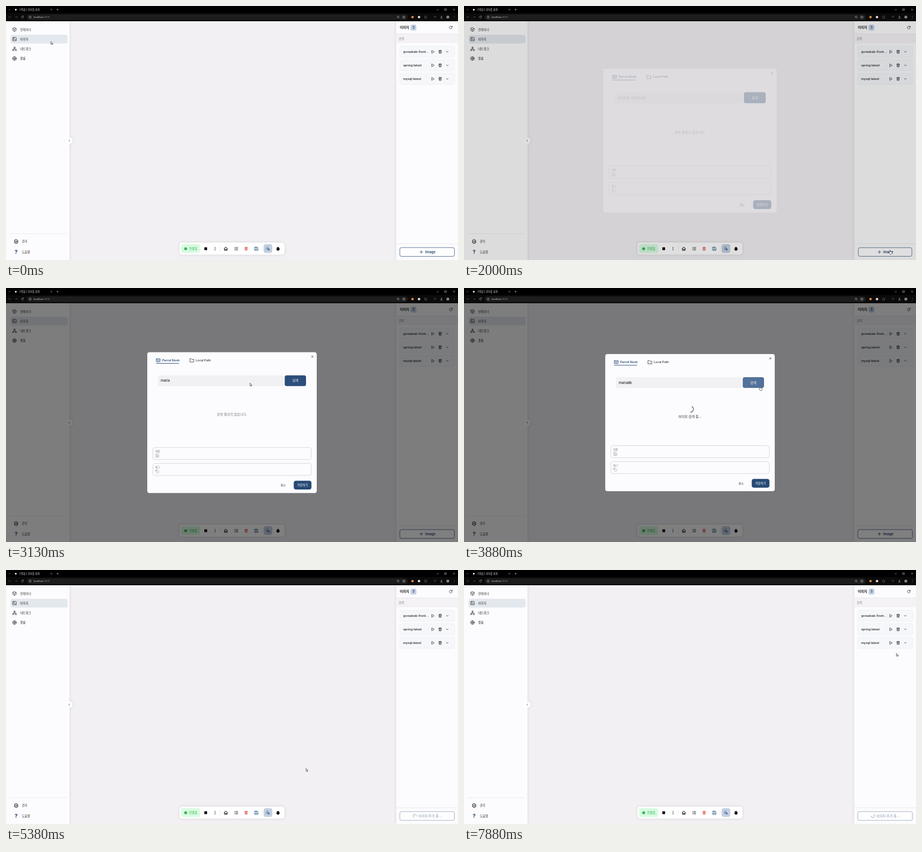
An HTML page that plays this animation: 800x450 px, repeating every 8000 ms.

```html
<!DOCTYPE html>
<html lang="ko">
<head>
<meta charset="utf-8">
<title>Image manager</title>
<style>
html, body { margin: 0; width: 100%; height: 100%; overflow: hidden; background: #f2f0f3; }
svg { display: block; width: 100vw; height: 100vh; }
text { font: 500 5.3px Inter, "Noto Sans CJK KR", "Noto Sans CJK", sans-serif; fill: #333; }
.bold { font-weight: 600; }
.mid { text-anchor: middle; }
.big { font-size: 5.9px; }
.i { fill: none; stroke: #333; stroke-width: .75; stroke-linecap: round; stroke-linejoin: round; }
.bar { fill: none; stroke: #bbb; stroke-width: .6; }
.soft { filter: drop-shadow(0 0 2px #0002); }
</style>
</head>
<body>
<svg viewBox="0 0 800 450">
  <defs>
    <g id="trash"><path d="M-2.6-1.8h5.2M-1-1.8v-.9h2v.9M-2-1.8l.2 4.6h3.6l.2-4.6M-.6-.4v2M.6-.4v2"/></g>
    <g id="folder"><path d="M-3.4 2.7v-5.4h2.5l1 1.1h3.3v4.3z"/></g>
    <g id="row">
      <rect x="697" y="71" width="97" height="20" rx="3" fill="#f6f7fa" stroke="#ecedf1" stroke-width=".7"/>
      <g class="i" stroke-width=".6">
        <path d="M753.9 78.8l4 2.3-4 2.4z"/>
        <use href="#trash" x="768.4" y="81"/>
        <path d="M779.5 80.4l1.6 1.5 1.6-1.5"/>
      </g>
    </g>
  </defs>

  <!-- side menu -->
  <g class="soft">
    <rect y="27" width="112.5" height="423" fill="#fcfbfd"/>
    <circle cx="112" cy="238.5" r="6" fill="#fff"/>
  </g>
  <path class="i" d="M112.6 237.2l-1.3 1.3 1.3 1.3"/>
  <rect x="8" y="51" width="101" height="15.5" rx="4" fill="#e3e8ee"/>
  <g class="i">
    <path d="M15 38.2l3 1.6v3.5l-3 1.7-3-1.7v-3.5zM12 39.8l3 1.7 3-1.7M15 41.5V45"/>
    <rect x="11.8" y="55.5" width="6.4" height="6.2" rx=".8"/>
    <path d="M12 60.7l2-2 1.3 1.2 1-1 1.8 1.7"/><circle cx="13.8" cy="57.3" r=".5"/>
    <circle cx="15" cy="73.6" r="1.2"/><circle cx="12.6" cy="78.2" r="1.2"/><circle cx="17.4" cy="78.2" r="1.2"/>
    <path d="M15 74.8v1.3M12.7 77l.3-.9h4l.3.9"/>
    <circle cx="15" cy="93" r="3.3"/><circle cx="15" cy="93" r="1.3"/>
    <path d="M11.7 93h2M16.3 93h2M15 89.7v2M15 94.3v2"/>
    <path d="M18 413.8l2.8 1.7v3.8l-2.8 1.7-2.8-1.7v-3.8z" stroke="#111" stroke-width="1"/><circle cx="18" cy="417.4" r="1.2"/>
  </g>
  <text x="25" y="43.5">컨테이너</text>
  <text x="25" y="60.5" fill="#222">이미지</text>
  <text x="25" y="78">네트워크</text>
  <text x="25" y="95">볼륨</text>
  <path d="M6 403.5h101" stroke="#e6e5e9" stroke-width=".7"/>
  <text x="28" y="419.4">관리</text>
  <text x="28" y="438.2">도움말</text>
  <text class="mid" x="18" y="439.4" style="font-size:9.5px;font-weight:700;fill:#20406e">?</text>

  <!-- image panel -->
  <rect class="soft" x="690.5" y="27" width="110" height="423" fill="#fcfbfd"/>
  <rect x="690.5" y="49.5" width="110" height="16.5" fill="#f4f2f5"/>
  <path d="M690.5 49.5H800M690.5 421.3H800" stroke="#e3e2e6" stroke-width=".7"/>
  <text x="697" y="40.2" style="font-size:6px;font-weight:700;fill:#222">이미지</text>
  <rect x="716" y="33" width="10.3" height="10.4" rx="3" fill="#c3d0e2"/>
  <text class="mid bold" x="721.1" y="40.4" style="font-size:6px;fill:#20406e">3</text>
  <path class="i" d="M789.6 37.2a2.5 2.5 0 1 0 0 2M789.9 35.4v2h-2"/>
  <text x="695" y="59.5" style="fill:#888">검색</text>
  <g id="rows"></g>
  <g id="add">
    <rect x="697" y="428" width="96.7" height="15.6" rx="3" fill="#fff" stroke="#3d5a86" stroke-width=".8"/>
    <g id="addIdle">
      <path class="i" d="M732.6 435.8h5M735.1 433.3v5" style="stroke:#20406e"/>
      <text class="bold" x="742" y="438" style="font-size:6.1px;fill:#20406e">Image</text>
    </g>
    <g id="addBusy">
      <circle id="smallSpin" class="i" cx="723.5" cy="435.8" r="2.9" pathLength="360" stroke-dasharray="240 120" style="stroke:#20406e"/>
      <text class="big" x="730" y="438" style="fill:#20406e">이미지 추가 중...</text>
    </g>
  </g>

  <!-- tool bar -->
  <rect class="soft" x="307" y="419" width="186" height="21.4" rx="5" fill="#fff"/>
  <rect x="310" y="422" width="33.5" height="15.5" rx="3.5" fill="#d8fbe0"/>
  <circle cx="318" cy="430" r="2.6" fill="#35b45a"/>
  <text x="324" y="432" style="fill:#35b45a">연결됨</text>
  <rect x="351" y="427.4" width="5" height="5" rx=".4" fill="#111"/>
  <g fill="#111"><circle cx="370" cy="427.8" r=".7"/><circle cx="370" cy="430" r=".7"/><circle cx="370" cy="432.2" r=".7"/></g>
  <path d="M379.2 425v10M453.4 425v10" stroke="#ddd" stroke-width=".6"/>
  <rect x="456" y="422" width="15.3" height="15.5" rx="4" fill="#c3d0e2"/>
  <g class="i">
    <path d="M386 429.8l3-2.8 3 2.8M386.8 429.4v3.6h1.5v-2h1.5v2h1.5v-3.6" stroke="#111" style="stroke-width:1"/>
    <path d="M404.4 427.8h.3M404.4 430h.3M404.4 432.2h.3M406.2 427.8h4M406.2 430h4M406.2 432.2h4" style="stroke:#111"/>
    <use href="#trash" x="425" y="430" style="stroke:#e5383f"/>
    <path d="M440.3 427.2h4.6l1.1 1.1v4.5h-5.7zM441.6 427.2v1.6h2.6v-1.6M441.6 432.8v-2h3v2" style="stroke:#2b5a85"/>
    <path d="M463 429.4l3.4 1.2-1.5.7 1.5 1.6M463 429.4l1.2 3.4.7-1.5M461 427.3l.6.7M463.4 426.6v.9M460.3 429.8h.9M461 432l.6-.6" style="stroke:#20406e"/>
  </g>
  <path d="M478.4 430.2l.9.8v-3.2q.6-.5 1 0v-.6q.5-.5 1 0v-.2q.6-.4 1 .1v.5q.6-.3 1 .2v1.3q.6-.3.9.2v1.8q-.2 2.4-2.6 2.4-1.6 0-2.4-1.2l-1.4-1.7z" fill="#111"/>

  <!-- dialog -->
  <rect id="dim" y="27" width="800" height="423"/>
  <g id="dialog">
    <rect id="sheet" x="250" width="300" rx="4" fill="#fcfbfd"/>
    <g id="upper">
      <path class="i" d="M540.7 123.3l3 3M543.7 123.3l-3 3"/>
      <g class="i" style="stroke:#2b4f7a"><rect x="266" y="128.4" width="6.8" height="5.6" rx=".6"/><path d="M266 130.3h6.8M267.4 132.4h4"/></g>
      <text class="bold" x="276.5" y="133.2" style="fill:#2b4f7a">Parcel Nook</text>
      <path d="M265.8 136.8h40.4" stroke="#2b4f7a" stroke-width=".9"/>
      <use class="i" href="#folder" x="329" y="131.3"/>
      <text x="336" y="133.2">Local Path</text>
      <rect x="269" y="158" width="222" height="19.2" rx="3" fill="#f1f0f2"/>
      <text id="query" class="big" x="274" y="169.7"></text>
      <rect id="find" x="493.3" y="158" width="37.7" height="19" rx="3.5"/>
      <text class="mid big" x="512.2" y="169.7" style="fill:#fff">검색</text>
    </g>
    <text id="none" class="mid big" x="400" y="225.8" style="fill:#777">검색 결과가 없습니다.</text>
    <g id="loading">
      <circle id="spin" class="i" cx="401" cy="214.7" r="5.2" pathLength="360" stroke-dasharray="150 210" style="stroke:#2b3f5c;stroke-width:1"/>
      <text class="mid big" x="400" y="230.4">이미지 검색 중...</text>
    </g>
    <g id="found">
      <rect id="hit" x="269" y="198" width="262" height="19" rx="3" stroke="#e3e2e6" stroke-width=".7"/>
      <text class="bold" x="274" y="209.5">mariadb</text>
    </g>
    <g id="lower">
      <g fill="none" stroke="#d3d2d7" stroke-width=".8">
        <rect x="259.8" y="279.3" width="280.6" height="21.4" rx="4"/>
        <rect x="259.8" y="307.4" width="280.6" height="21.4" rx="4"/>
      </g>
      <text x="264.3" y="287.5" style="font-size:4.3px;fill:#666">이름</text>
      <text x="264.3" y="315.6" style="font-size:4.3px;fill:#666">태그</text>
      <g class="i" style="stroke:#888;stroke-width:.6">
        <path d="M265.5 290.7h3.2l1.5 1.5v4.4h-4.7zM266.8 293.2h2M266.8 294.9h2"/>
        <path d="M265 319.3h2.9l3.2 3.2-2.7 2.7-3.4-3.3z"/><circle cx="266.4" cy="320.7" r=".3"/>
      </g>
      <g id="filled"><text x="274" y="295.5">mariadb</text><text x="274" y="324">latest</text></g>
      <text class="mid" x="490.5" y="348.2" style="font-size:5px">취소</text>
      <rect x="509.3" y="338.3" width="31.3" height="15.5" rx="4" fill="#264a74"/>
      <text class="mid" x="525" y="348.2" style="font-size:5.2px;fill:#fff">저장하기</text>
    </g>
  </g>

  <!-- browser -->
  <rect width="800" height="27" fill="#0b0b0b"/>
  <rect width="800" height="12.5" fill="#000"/>
  <rect x="37" y="14.7" width="674" height="10" rx="5" fill="#1d1d1d"/>
  <circle cx="17.3" cy="6.4" r="1.5" fill="#fff"/>
  <text x="23" y="8" style="font-size:4.3px;fill:#ddd">구름솥 | 상자를 쉽게</text>
  <text x="49" y="21.3" style="font:4.2px 'Open Sans',sans-serif;fill:#eee">localhost<tspan fill="#888">:3000</tspan></text>
  <g class="bar">
    <path d="M5 5.8l1.2 1.2 1.2-1.2M79 5.2l2.4 2.4M81.4 5.2L79 7.6M89.6 6.4h3.4M91.3 4.7v3.4M762.5 6.7h3.4M791.5 4.8l3 3M794.5 4.8l-3 3"/>
    <rect x="776.6" y="5" width="2.8" height="2.8"/>
    <path d="M9 19.6H5M6.5 18L5 19.6l1.5 1.6M16 19.6h4M18.5 18l1.5 1.6-1.5 1.6" stroke="#555"/>
    <path d="M31 18.6a1.9 1.9 0 1 0 .1 1.8M31.2 17.3v1.5h-1.5"/>
    <circle cx="42.8" cy="19.6" r="1.8"/><path d="M42.8 19.4v1.2"/>
    <circle cx="693.8" cy="19.2" r="1.5"/><path d="M695 20.4l1.3 1.3"/>
    <path d="M704.2 17.2l.7 1.6 1.8.1-1.4 1.1.5 1.8-1.6-1-1.6 1 .5-1.8-1.4-1.1 1.8-.1z"/>
    <path d="M741 18h1.2q.5-1.2 1 0h1.3v3.5H741z" stroke="#777"/>
    <path d="M757.5 18.5h4M757.5 20.3h2" stroke="#777"/>
    <path d="M770.7 17v3.2M769.2 18.9l1.5 1.4 1.5-1.4M768.7 21.7h4"/>
  </g>
  <circle cx="719.5" cy="19.6" r="2.2" fill="#e58a3c"/>
  <circle cx="731" cy="19.6" r="2.2" fill="#eadfe0"/>
  <circle cx="782" cy="19.6" r="2.6" fill="#8d7f84"/>
  <g fill="#bbb"><circle cx="793.5" cy="18" r=".4"/><circle cx="793.5" cy="19.6" r=".4"/><circle cx="793.5" cy="21.2" r=".4"/></g>

  <g id="cursor" fill="#fff" stroke="#222" stroke-width=".6" stroke-linejoin="round">
    <path id="arrow" d="M0 0v5l1.2-1 .9 1.8.8-.4-.8-1.7h1.5z"/>
    <path id="hand" d="M1.6 0q.7 0 .7.7v2l2.4.5q.8.2.7 1l-.5 2.2-.5.8H1.8L-.1 4.4q.3-.8 1-.1V.7Q.9 0 1.6 0z"/>
  </g>
</svg>
<script>
const LOOP = 8000, STEP = 125;
const $ = id => document.getElementById(id);
const set = (id, name, value) => $(id).setAttribute(name, value);
const show = (id, on) => set(id, 'visibility', on ? 'inherit' : 'hidden');
const ramp = (t, a, b) => Math.min(1, Math.max(0, (t - a) / (b - a)));
const smooth = p => p * p * (3 - 2 * p);

$('rows').innerHTML = ['goraebab-front...', 'spring:latest', 'mysql:latest'].map((name, i) =>
  `<g transform="translate(0 ${i * 24})"><use href="#row"/>
   <text class="bold" x="703" y="83.2" style="font-size:5.4px">${name}</text></g>`).join('');

// pointer path: time, x, y
const path = [
  [60, 79.5, 62.8], [500, 780, 397], [1060, 780, 397], [1500, 752.3, 432.5],
  [2130, 752.3, 432.5], [2500, 400, 166], [3000, 400, 166], [3375, 522.5, 174.5],
  [4300, 522.5, 174.5], [4500, 470, 206], [4625, 470, 206], [5000, 534, 363],
  [5130, 530.5, 351.5], [6000, 533, 351.5], [6450, 620, 240], [6875, 720, 167],
  [7500, 765, 141], [7750, 765, 141], [7875, 765.3, 147.5]
];
const handTimes = [[1250, 2250], [3250, 4375], [4500, 4750], [5100, 5250]];
const within = (t, spans) => spans.some(([a, b]) => t >= a && t < b);

function pointer(t) {
  const i = path.findIndex(p => p[0] > t);
  if (i === 0) return path[0].slice(1);
  if (i < 0) return path.at(-1).slice(1);
  const [a, x, y] = path[i - 1], [b, u, v] = path[i];
  const p = smooth(ramp(t, a, b));
  return [x + (u - x) * p, y + (v - y) * p];
}

function draw(t) {
  const open = ramp(t, 1953, 2143) * (1 - ramp(t, 5160, 5340));
  const empty = t < 3500, loading = !empty && t < 4375;
  const stretch = empty ? 3.25 : 0;

  set('dim', 'opacity', open * .5);
  set('dialog', 'opacity', open);
  set('dialog', 'transform', `translate(400 238.5) scale(${1.03 - .03 * open}) translate(-400 -238.5)`);
  set('sheet', 'y', 117 - stretch);
  set('sheet', 'height', 243 + 2 * stretch);
  set('upper', 'transform', `translate(0 ${-stretch})`);
  set('lower', 'transform', `translate(0 ${stretch})`);
  show('none', empty);
  show('loading', loading);
  show('found', t >= 4375);
  show('filled', t >= 4625);
  set('hit', 'fill', t >= 4500 ? '#e3e8ee' : '#fcfbfd');
  set('find', 'fill', within(t, [handTimes[1]]) ? '#53719a' : '#2b4f7a');

  const typed = 'mariadb'.slice(0, Math.max(0, (t - 2625) / STEP + 1));
  $('query').textContent = typed || '이미지를 검색하세요';
  $('query').style.fill = typed ? '#222' : '#888';

  const busy = t >= 5200;
  const press = 1 - .1 * ramp(t, 1725, 1850) * (1 - ramp(t, 1900, 2025));
  set('add', 'transform', `translate(745.3 435.8) scale(${press}) translate(-745.3 -435.8)`);
  set('add', 'opacity', busy ? .55 : 1);
  show('addIdle', !busy);
  show('addBusy', busy);
  const turn = t * .36 - 15;
  set('spin', 'transform', `rotate(${turn} 401 214.7)`);
  set('smallSpin', 'transform', `rotate(${turn} 723.5 435.8)`);

  const hand = within(t, handTimes);
  set('cursor', 'transform', `translate(${pointer(t)})`);
  show('arrow', !hand);
  show('hand', hand);
}

function tick(now) {
  draw(Math.floor(now % LOOP / STEP) * STEP);
  requestAnimationFrame(tick);
}
draw(0);
requestAnimationFrame(tick);
</script>
</body>
</html>
```
